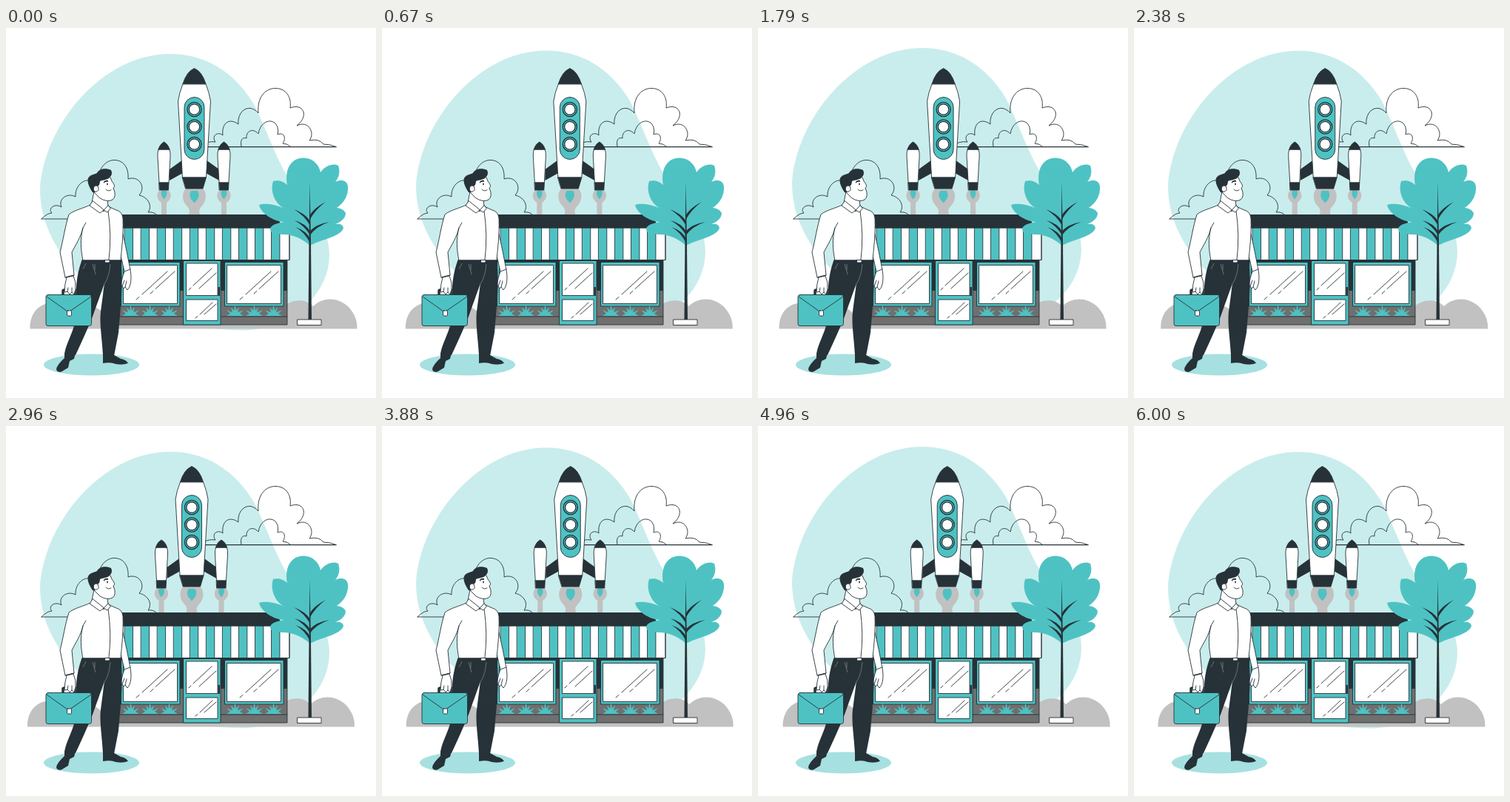
These frames come from a looping animation (500x500 px, 6040 ms). An HTML page:

```html
<!DOCTYPE html>
<html lang="en">
<head>
<meta charset="utf-8">
<title>Shop launch</title>
<style>
html, body { margin: 0; width: 100%; height: 100%; overflow: hidden; background: #fff; }
svg { display: block; width: 100%; height: 100%; }
.line { stroke: #263238; stroke-width: .9; stroke-linecap: round; stroke-linejoin: round; }
.bold { stroke-width: 1.3; }
.none { fill: none; }
.white { fill: #fff; }
.dark { fill: #263238; }
.teal { fill: #4ec2c3; }
.gray { fill: #c1c1c1; }
.wall { fill: #6f6f6f; }
</style>
</head>
<body>
<svg viewBox="0 0 500 500">
  <defs>
    <g id="booster">
      <path class="line white" d="M-7.5 164 Q-9 169 -8.5 174 L-6.5 209 H6.5 L8.5 174 Q9 169 7.5 164Z"/>
      <path class="line dark" d="M-7.5 164 Q-5.500 157 0 154 Q5.500 157 7.5 164Z M-6.500 209 H6.500 L6 219 H-6Z"/>
    </g>
    <g id="puff">
      <path class="gray" d="M-6 219 C-11 224 -10 232 -3.500 236 V252 H3.500 V236 C10 232 11 224 6 219Z"/>
      <path class="teal" d="M-3 219.500 H3 Q6 225 0 231.500 Q-6 225 -3 219.500Z"/>
    </g>
    <g id="window">
      <rect class="line teal" x="0" y="316.500" width="79" height="59.500"/>
      <rect class="line white" x="3" y="320.500" width="72.500" height="52"/>
      <path class="line none" d="M20 367 L24 363.500 M28 360 L62 329 M39 359 L43 355.500 M46 352.500 L72 329"/>
    </g>
    <path id="tuft" class="teal" d="M-11 389 L-6 386 -11 381 -3 384.500 -5 377.500 -.8 382 .5 373.500 2 382 6 377 4 384.500 12 381 7 386 12 389Z"/>
    <g id="port">
      <circle class="line bold teal" r="9.600"/>
      <circle class="line bold white" r="7.200"/>
    </g>
  </defs>

  <path id="blob" fill="#c9edec" d="M222 35 C268 35 308 58 335 103 C354 141 366 181 388 213 C413 247 437 270 437 307 C436 370 372 408.500 320 408.500 C265 408 195 395 150 370 C115 350 92 330 76 307 C56 277 46 250 46 217 C52 130 130 35 222 35Z"/>

  <g class="line none">
    <path d="M48 258 H203"/>
    <path d="M48 258 Q56 250 62 250 C56 244 66 236 75 242 C70 231 83 222 94 228 C93 214 104 204 114 206 C124 211 122 218 123 210 C124 190 135 178 147 178.500 C160 179 166 190 165 204 C179 199 190 214 180 226 C193 229 198 241 192 249 Q199 248 203 252"/>
    <path class="bold" d="M262 160.700 H446"/>
    <path d="M262 160 Q272 152 283 154 C277 146 286 139 293 145 C291 128 302 121 314 130 C312 113 328 100 341 115 C339 94 350 81 365 81.500 C379 82 386 94 384 108 C402 101 410 119 393 132 C409 124 418 142 410 152 Q423 149 429 157 Q438 157 446 160.500"/>
    <path d="M318 160 C316 151 320 147 325 149 C324 140 333 134 341 143 C343 130 352 125 358 126 C366 127 369 136 367 144 C376 140 379 149 374 156 Q380 156 384 160"/>
  </g>

  <path id="bushes" class="gray" d="M32.500 406.500 C32 388 42 374 58 372 C70 371 78 374 84 382 C98 364 128 374 140 395 H370 V381 C383 366 404 364 415 376 C432 360 456 366 467 382 Q475 393 474.500 406.500Z"/>

  <g id="rocket">
    <use href="#puff" x="213.500"/>
    <use href="#puff" x="294.500"/>
    <path class="gray" d="M243 217 C237 223 238 234 244 240 Q250 246 247 252 H262 Q259 246 265 240 C271 234 272 223 266 217Z"/>
    <path class="teal" d="M250 220 H259 Q264 228 254.500 236.500 Q245 228 250 220Z"/>
    <path class="dark" d="M239 178 L221 191 V206 L239 196Z M270 178 L288 191 V206 L270 196Z"/>
    <use href="#booster" x="213.500"/>
    <use href="#booster" x="294.500"/>
    <path class="line white" d="M239 75.500 Q234 88 232.500 99 L238.500 202 H270.500 L276.500 99 Q275 88 270 75.500Z"/>
    <path class="line dark" d="M239 75.500 Q244 59 254.500 54.500 Q265 59 270 75.500Z M238.500 202 H270.500 L266 217 H243Z"/>
    <rect class="line teal" x="241" y="93.500" width="27" height="84" rx="13.500"/>
    <use href="#port" x="254.500" y="110"/>
    <use href="#port" x="254.500" y="133.500"/>
    <use href="#port" x="254.500" y="157"/>
  </g>

  <g id="shop">
    <path class="dark" d="M152 252 H366 L373 270 H152Z"/>
    <rect class="line wall" x="150" y="313" width="230" height="88"/>
    <path class="dark" d="M150 313 H380 V355 H150Z"/>
    <rect class="line white" x="152" y="270" width="231" height="43.500"/>
    <g id="stripes" class="teal"></g>
    <path class="line none" d="M152 270 H383 V313.500 H152 M150 390 H380"/>
    <use href="#window" x="156"/>
    <use href="#window" x="296"/>
    <g id="tufts"></g>
    <rect class="line teal" x="240" y="314.500" width="50" height="86.500"/>
    <path class="line white" d="M244 318 H286 V361.500 H244Z M244 367 H286 V395.500 H244Z"/>
    <path class="line none" d="M247 354 L250 351 M253 348 L278 325 M261 352 L284 331 M256 392 L259 389.500 M262 387 L279 371 M268 387 L284 373"/>
    <rect class="dark" x="286.500" y="350" width="2.500" height="12"/>
  </g>

  <ellipse cx="115.500" cy="455" rx="64.500" ry="14.500" fill="#a6e0e0"/>

  <g id="man">
    <path class="line white" d="M155 268 C160 285 164 306 168 327 C170 338 169 349 164 354 L161 350 159 352 157 349 154 348 C157 342 157 336 160 329 L152 295Z"/>
    <path class="line none" d="M160 329 L168 326 M161 350 L163 342 M157 349 L160 341"/>
    <path class="dark" d="M102 315 H155 C159 345 155 375 152 412 L146 443 H131 C130 420 126 400 128 383 L133 345 C127 362 122 376 117 390 C110 407 102 425 94 442 H79 C80 427 92 412 96 385 C93 355 95 335 102 315Z"/>
    <path class="dark" d="M79 439 L79 446 Q69 455 68 461 Q69 466 75 464.500 L84 459 86 450 92 447 94 439Z M131 441 L131 453 Q142 451 148 454 Q158 456 165 453 Q162 448 155 447 L146 442Z"/>
    <path class="line white" d="M114 239 C104 244 92 246 85 252 C80 267 77 288 73 303 L80 337 92 334 89 303 C94 293 101 283 104 270 C100 285 101 300 104 314 H155 C156 300 159 280 158 257 Q157 248 149 246 L138 241Z"/>
    <path class="line none" d="M104 270 L108 263 M138 247 Q143 280 139 313 M80 337 L92 334"/>
    <path class="dark" d="M102 313.500 H155 V317 H102Z"/>
    <path class="line white" d="M134 313.500 H140 V317 H134Z"/>
    <path d="M117 319 L121 333 M120 319 V327 M141 319 Q140 335 133 346 M108 318 L104 326" fill="none" stroke="#9a9a9a" stroke-width=".6"/>

    <path class="line white" d="M119 221 L116 236 132 248 138 241 137 232Z"/>
    <path class="line white" d="M124 206 C130 201 137 200 141 202 L143 207 Q149 214 145 216 L147 222 Q148 229 144 232 Q137 236 127 230 L118 221Z"/>
    <path class="dark" d="M117 222 C113 216 109 208 111 203 C114 198 119 198 123 196 C126 190 135 189 142 192 Q145 198 139 203 C135 206 130 205 127 207 Q127 212 124 214 L124 219 Q121 223 117 222Z"/>
    <path class="line white" d="M124 214 C120 211 117 216 119 220 Q122 223 125 219Z"/>
    <path class="dark" d="M132 208 Q134 205 138 206 L138 208 Q134 207 132 210Z"/>
    <ellipse class="dark" cx="137" cy="211" rx=".9" ry="1.400"/>
    <path class="line none" d="M135 218 Q138 221.500 142 219"/>
    <path class="line white" d="M117 234 L113 240 127 250 132 246Z M138 240 L132 246 137 249 141 244Z"/>

    <path d="M77 361 V355 Q77 354 79 354 H93 V361" fill="none" stroke="#263238" stroke-width="3.500"/>
    <path class="line white" d="M82 337 L91 335 Q95 343 94 353 L92 360 89 357 86 360 83 356 79 357 Q79 347 82 337Z"/>
    <path class="line none" d="M83 356 L84 351 M89 357 V351"/>
    <rect class="line teal" x="54" y="360.500" width="61.500" height="42" rx="3"/>
    <path class="line none" d="M55 363 L84.500 384 115 363"/>
    <rect class="line white" x="82.500" y="382" width="6" height="7" rx="1"/>
  </g>

  <g id="tree">
    <path class="teal" d="M411 294 C400 285 390 280 377 279 C369 279 362 278 358 275 C354 267 365 264 376 262 C362 262 344 250 342 239 C351 236 366 239 376 244 C362 236 357 220 361 207 Q371 204 380 212 C376 190 386 175.500 402 175.500 C414 175.500 423 184 425 195 C431 186 443 182 449 186 C452 194 450 202 445 208 C453 204 461 206 462 214 C463 226 457 236 447 243 Q456 244 459 250 C459 257 453 262 445 265 Q455 264 456 270 C453 282 425 286 411 294Z"/>
    <path class="dark" d="M410.500 208 L412 290 413 395 H408.500 L409.500 290Z"/>
    <path class="dark" d="M389 245 Q405 251 411 261 V267 Q403 253 389 245Z M432 235 Q416 243 410 254 V260 Q418 245 432 235Z M390 260 Q405 264 411 275 V280 Q403 267 390 260Z M437 262 Q419 265 410 275 V281 Q419 268 437 262Z M391 269 Q406 274 411 285 V291 Q404 276 391 269Z"/>
    <path class="line white" d="M394 394 H426 V401.500 H394Z"/>
  </g>
</svg>
<script>
const $ = id => document.getElementById(id);
const LOOP = 6040, CYCLE = 6000;
const shakeStops = [0, -1, 2, -4, 4, -4, 4, -4, 2, -1, 0];

$('stripes').innerHTML = Array.from({ length: 10 }, (_, i) =>
  `<rect class="line" x="${160.5 + 22.05 * i}" y="270" width="11" height="43.5"/>`).join('');
$('tufts').innerHTML = [168, 194, 220, 309, 335, 361].map(x =>
  `<use href="#tuft" x="${x}"/>`).join('');

function shake(t) {
  const p = t % CYCLE / CYCLE * 10, i = Math.floor(p);
  return shakeStops[i] + (shakeStops[i + 1] - shakeStops[i]) * (p - i);
}

// Steady rise and fall, ten pixels every three seconds
function float(t) {
  return -10 * (1 - Math.abs(t % 3000 / 1500 - 1));
}

const move = (id, x, y) => $(id).setAttribute('transform', `translate(${x} ${y})`);

function draw() {
  const t = performance.now() % LOOP, x = shake(t);
  move('blob', 0, float(t));
  move('bushes', x, 0);
  move('rocket', x, 0);
  requestAnimationFrame(draw);
}
draw();
</script>
</body>
</html>
```
